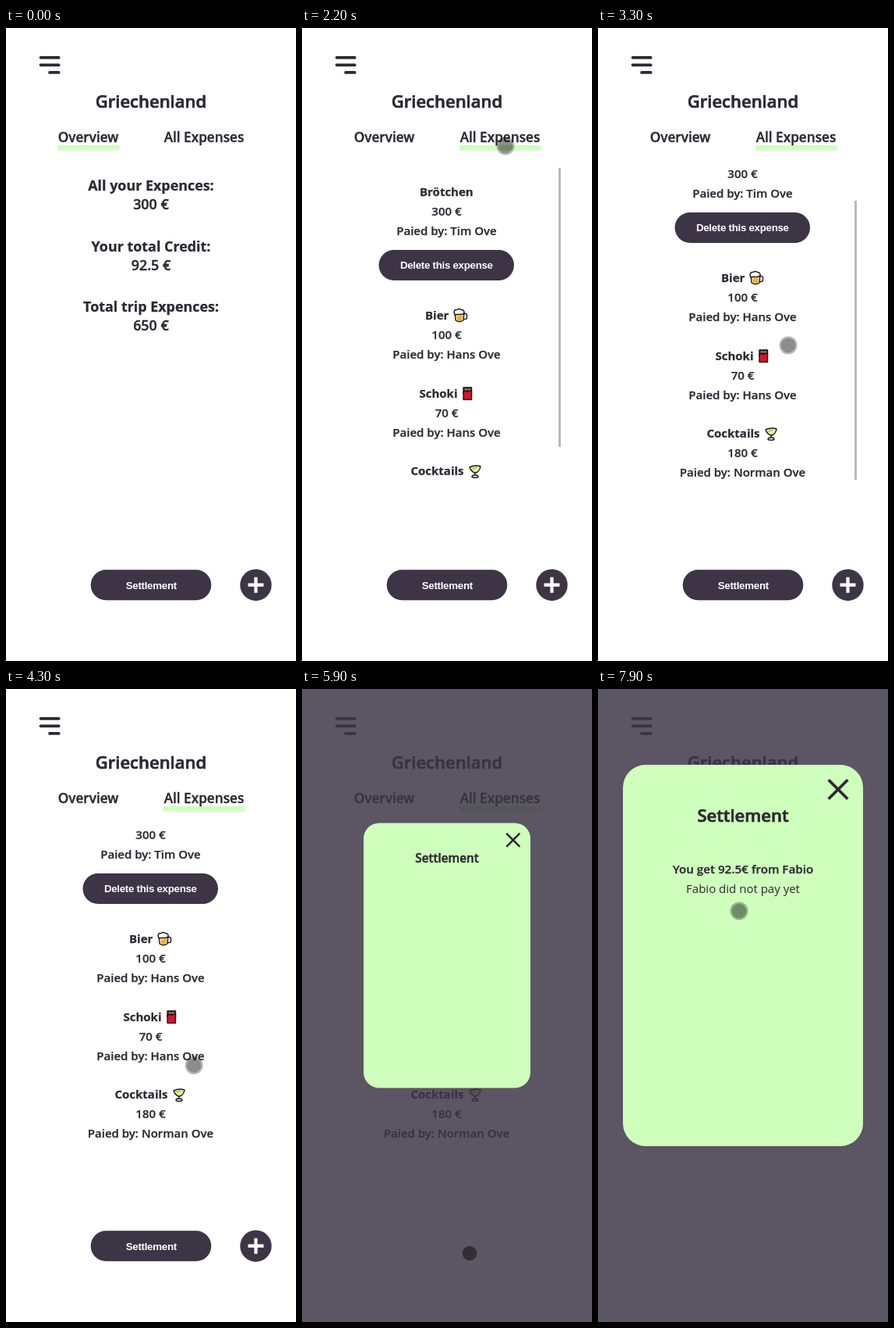
Write an HTML page that moves like this. It is 372 by 810 pixels and loops after 8 s.

```html
<!DOCTYPE html>
<html lang="de">
<head>
<meta charset="utf-8">
<title>Trip expenses</title>
<style>
  html, body { margin: 0; width: 100%; height: 100%; overflow: hidden; background: #fff; }
  svg { display: block; width: 100%; height: 100%; }
  text { font: 600 15px "Open Sans", "Noto Sans", sans-serif; fill: #2d2833; stroke: #2d2833; stroke-width: .25; white-space: pre; }
  .mid { text-anchor: middle; }
  .title { font-size: 22px; stroke-width: .7; }
  .tab { font-size: 17.2px; stroke-width: .4; }
  .head { font-size: 17.9px; font-weight: 700; }
  .sum { font-size: 17.9px; stroke-width: .4; }
  .item { font-weight: 700; }
  .note { font-weight: 400; stroke: none; }
  .lead { font-size: 15.2px; }
  .label { font: 700 13.3px "Liberation Sans", Arial, sans-serif; letter-spacing: -.28px; fill: #fff; stroke: none; text-anchor: middle; }
  .dark { fill: #3d3546; }
  .mint { fill: #ceffbc; }
  .line { fill: none; stroke: #2d2833; stroke-width: 3.7; stroke-linecap: round; }
  .icon { stroke: #1c1a1c; stroke-width: 1.4; stroke-linejoin: round; stroke-linecap: round; }
</style>
</head>
<body>
<svg viewBox="0 0 372 810">
  <defs><clipPath id="viewport"><rect y="179" width="372" height="400"/></clipPath></defs>

  <path class="line" d="M44.5 37.8H67.7M44.5 47.3H67.7M56 56.900H67.7"/>
  <text class="mid title" x="186" y="102">Griechenland</text>
  <rect id="underline" class="mint" y="150" height="6.5"/>
  <text class="mid tab" x="105.5" y="146">Overview</text>
  <text class="mid tab" x="254" y="146">All Expenses</text>

  <g id="overview"></g>

  <g id="expenses" clip-path="url(#viewport)">
    <g id="list">
      <rect class="dark" x="98.5" y="284" width="173.5" height="39" rx="19.5"/>
      <text class="label" x="185.3" y="308">Delete this expense</text>
      <g class="icon" transform="translate(194 359)">
        <path d="M13 6.5h2.5q2 0 2 2v3q0 2-2 2H13" fill="none"/>
        <path d="M2 5L3 15Q8 18.500 13 15L14 5Z" fill="#fbe3a4"/>
        <path d="M4.500 10L5 15Q8 16.500 11 15L11.500 9Z" fill="#f2ae30" stroke="none"/>
        <path d="M1 5Q1 1 5 1.500Q8-.5 10.500 1.500Q14.500 1.500 14 6L11 7.500H5L2 8Z" fill="#fffdf3"/>
      </g>
      <g class="icon" transform="translate(206 459)">
        <path d="M1 1H11.500V9H1Z" fill="#5a3021"/>
        <path d="M1 6.500L4 5.500L6 6.500L9 5L11.500 6V16.500H1Z" fill="#d8142b"/>
        <path d="M3.500 3.500H5M7.500 3.500H9" stroke="#d9a27c"/>
      </g>
      <g class="icon" transform="translate(214 559)">
        <path d="M1 3Q8-.5 15 2Q14 8 9.500 10H6.500Q2 7 1 3Z" fill="#e4efa0"/>
        <path d="M8 10V13"/>
        <path d="M4 15.500Q4 13 8 13T12 15.500Q8 17.500 4 15.500Z" fill="#f2f7dc"/>
        <path d="M5 5L10 3" stroke="#a9bd57"/>
      </g>
    </g>
  </g>
  <rect id="thumb" x="329" width="3" height="357" fill="#b9b9b9"/>

  <g id="buttons">
    <rect class="dark" x="108.700" y="693.300" width="154.600" height="39" rx="19.500"/>
    <text class="label" x="186.300" y="717.500">Settlement</text>
    <circle class="dark" cx="320.500" cy="712.700" r="20.200"/>
    <path class="line" d="M310.500 712.700H330.500M320.500 702.700V722.700" style="stroke:#fff;stroke-width:4.200;stroke-linecap:butt"/>
  </g>

  <g id="dialog">
    <rect class="dark" width="372" height="810" opacity=".84"/>
    <g id="card">
      <rect class="mint" x="32" y="97" width="308" height="488" rx="29"/>
      <path class="line" d="M297 117.500L319 139.500M319 117.500L297 139.500" style="stroke-linecap:square"/>
      <text class="mid title" x="186" y="170">Settlement</text>
      <g id="debts">
        <text class="mid lead" x="186" y="235.500">You get 92.5€ from Fabio</text>
        <text class="mid note" x="186" y="260.500">Fabio did not pay yet</text>
      </g>
    </g>
  </g>

  <g id="pointer">
    <circle id="ring" r="11.500" opacity=".28"/>
    <circle id="dot" r="9.300"/>
  </g>
</svg>
<script>
const LOOP = 8000;
const $ = id => document.getElementById(id);
const clamp = v => Math.min(1, Math.max(0, v));
const progress = (t, from, to) => clamp((t - from) / (to - from));
const smooth = p => p * p * (3 - 2 * p);
const show = (id, on) => $(id).style.display = on ? '' : 'none';

function addText(parent, cls, x, y, content) {
  const el = document.createElementNS('http://www.w3.org/2000/svg', 'text');
  el.setAttribute('class', cls);
  el.setAttribute('x', x);
  el.setAttribute('y', y);
  el.textContent = content;
  $(parent).append(el);
}

[['All your Expences:', '300 €'], ['Your total Credit:', '92.5 €'], ['Total trip Expences:', '650 €']]
  .forEach(([head, sum], i) => {
    addText('overview', 'mid head', 186, 208 + i * 77.5, head);
    addText('overview', 'mid sum', 186, 232 + i * 77.5, sum);
  });

[[215, 'Brötchen', 151, '300 €', 'Tim Ove'],
 [373, 'Bier', 158, '100 €', 'Hans Ove'],
 [472.5, 'Schoki', 150.5, '70 €', 'Hans Ove'],
 [572, 'Cocktails', 139.5, '180 €', 'Norman Ove']]
  .forEach(([y, name, x, cost, payer]) => {
    addText('list', 'item', x, y, name);
    addText('list', 'mid', 185.5, y + 25, cost);
    addText('list', 'mid', 185.5, y + 50, 'Paied by: ' + payer);
  });

// Pointer stops: time, x, y
const path = [
  [250, 384, 105], [500, 325, 150], [800, 262, 270], [1100, 239, 197],
  [1400, 253, 160], [1500, 253, 160], [1600, 272, 150], [1700, 261, 151],
  [2500, 261, 151], [2850, 244, 454], [3300, 244, 406], [3400, 244, 406],
  [3700, 198, 440], [4000, 232, 455], [4200, 232, 455], [4600, 268, 560],
  [5100, 221, 716], [5200, 215, 722], [6700, 215, 722], [7000, 208, 496],
  [7100, 208, 496], [7600, 199, 284], [7800, 199, 284], [7900, 181, 284]
];

function pointerAt(t) {
  const next = path.findIndex(p => p[0] > t);
  if (next < 0) return path[path.length - 1].slice(1);
  if (next === 0) return path[0].slice(1);
  const [t0, x0, y0] = path[next - 1], [t1, x1, y1] = path[next];
  const p = progress(t, t0, t1);
  return [x0 + (x1 - x0) * p, y0 + (y1 - y0) * p];
}

function draw(t) {
  const onList = t >= 2000, open = t >= 5900;
  const pressing = t >= 5200 && t < 6800;
  show('overview', !onList);
  show('expenses', onList);
  show('buttons', !open);
  show('dialog', open);
  show('debts', t >= 6300);
  show('pointer', t >= 300);
  show('ring', !pressing);

  $('underline').setAttribute('x', onList ? 202 : 66);
  $('underline').setAttribute('width', onList ? 104.5 : 79.5);

  const scroll = 48 * smooth(progress(t, 2880, 3280));
  $('list').setAttribute('transform', `translate(0 ${-scroll})`);
  $('thumb').setAttribute('y', 179 + scroll * 42 / 48);
  $('thumb').setAttribute('opacity', onList ? 1 - progress(t, 3450, 3950) : 0);

  const scale = 1 - 0.305 * (1 - progress(t, 5950, 6400)) ** 2;
  $('card').setAttribute('transform', `translate(186 341) scale(${scale}) translate(-186 -341)`);

  $('dot').setAttribute('opacity', pressing ? 0.45 : 0.24);
  $('pointer').setAttribute('transform', `translate(${pointerAt(t)})`);
}

const start = performance.now();
function tick() {
  draw((performance.now() - start) % LOOP);
  requestAnimationFrame(tick);
}
draw(0);
requestAnimationFrame(tick);
</script>
</body>
</html>
```
